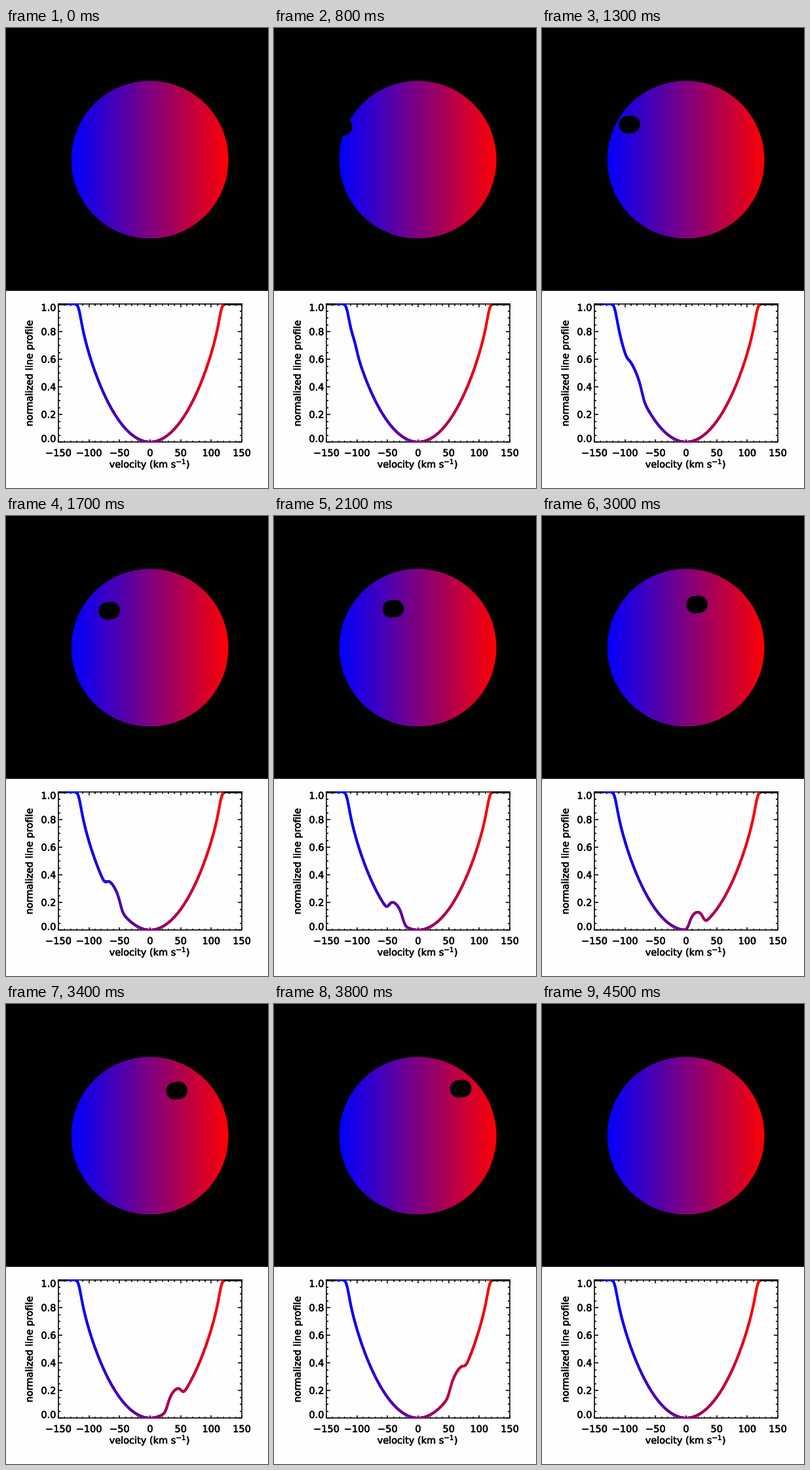
Write a matplotlib script that moves like this. It is 400x700 px and loops after 5300 ms.

```python
import numpy as np
import matplotlib.pyplot as plt
from matplotlib.animation import FuncAnimation
from matplotlib.collections import LineCollection
from matplotlib.patches import Circle, Rectangle
from matplotlib.patheffects import withStroke

W, H, DPI = 400, 700, 100
PT = 72 / DPI                     # points per pixel
FRAMES, STEP = 53, 100
FIRST, LAST = 8, 44               # frames with the planet in transit
CX, CY, R = 219.6, 200.4, 120     # star
RP = 13.3                         # planet radius
VSINI, LIMB, BLUR = 116, 0.65, 3
LEFT, RIGHT, TOP, BOTTOM = 80, 360, 420, 630
SKY, PAPER = "#010200", "#fefefe"

plt.rcParams["mathtext.fontset"] = "dejavusans"
fig = plt.figure(figsize=(W / DPI, H / DPI), dpi=DPI, facecolor=PAPER)
ax = fig.add_axes([0, 0, 1, 1])
ax.axis("off")


def px(v):
    return LEFT + (v + 150) * (RIGHT - LEFT) / 300


def py(f):
    return BOTTOM - f * (BOTTOM - TOP)


def doppler(t):
    """Blue to red as t goes from 0 to 1."""
    t = np.clip(t, 0, 1)
    return np.stack([t, 0 * t, 1 - t], axis=-1)


def label(x, y, s, ha="center", **kw):
    ax.text(x, y, s, family="DejaVu Sans", size=14.5 * PT, color="black",
            ha=ha, va="baseline",
            path_effects=[withStroke(linewidth=0.4, foreground="black")], **kw)


def line(x, y):
    ax.plot(x, y, color="black", lw=1.6 * PT, solid_capstyle="butt", zorder=4)


def planet(n):
    return 133.5 + 6.06 * (n - 13), 147 - 0.725 * (n - 13)


# line profile
pad = np.arange(-170, 170.5, 0.5)
shown = np.abs(pad) <= 150
vel = pad[shown]
strip = pad / VSINI
chord = np.clip(1 - strip ** 2, 0, None)
kernel = np.exp(-0.5 * (np.arange(-15, 15.5, 0.5) / BLUR) ** 2)
kernel /= kernel.sum()


def blur(a):
    return np.convolve(a, kernel, mode="same")[shown]


star = blur(2 * (1 - LIMB) * np.sqrt(chord) + LIMB * np.pi / 2 * chord)


def blocked(n):
    """Light hidden by the planet in each velocity strip."""
    x0, y0 = planet(n)
    half = np.sqrt(np.clip((RP / R) ** 2 - (strip - (x0 - CX) / R) ** 2, 0, None))
    k = np.linspace(-0.975, 0.975, 40)[:, None]
    mu2 = 1 - strip ** 2 - ((y0 - CY) / R + k * half) ** 2
    light = np.where(mu2 > 0, 1 - LIMB * (1 - np.sqrt(np.clip(mu2, 0, None))), 0)
    return blur(2 * half * light.mean(axis=0))


def profile(n):
    flux = star - blocked(n) if FIRST <= n <= LAST else star
    pts = np.column_stack([px(vel), py(1 - flux / star.max())])
    return np.stack([pts[:-1], pts[1:]], axis=1)


# star and planet
ax.add_patch(Rectangle((0, 0), W, 400, color=SKY, lw=0))
shades = doppler((np.arange(240) + 0.5) / 240)[None]
disc = ax.imshow(shades, extent=(CX - R, CX + R, CY + R, CY - R),
                 interpolation="nearest", aspect="auto", zorder=2)
ax.set_xlim(0, W)
ax.set_ylim(H, 0)
disc.set_clip_path(Circle((CX, CY), R, transform=ax.transData))
spots = [ax.add_patch(Circle((0, 0), RP, color=SKY, lw=0, zorder=3)) for _ in range(2)]

# plot frame, ticks and labels
line([LEFT, RIGHT, RIGHT, LEFT, LEFT], [TOP, TOP, BOTTOM, BOTTOM, TOP])
for v in range(-150, 151, 10):
    size = 2.5 if v % 50 else 4.5
    line([px(v)] * 2, [BOTTOM, BOTTOM - size])
    line([px(v)] * 2, [TOP, TOP + size])
for v in range(-150, 151, 50):
    label(px(v), 651.5, str(v).replace("-", "\u2212"))
for k in range(21):
    y = py(k / 20)
    size = 3 if k % 4 else 6
    line([LEFT, LEFT + size], [y, y])
    line([RIGHT, RIGHT - size], [y, y])
for k in range(6):
    base = np.clip(py(k / 5) + 5.3, TOP + 10.5, BOTTOM)
    label(76.5, base, f"{k / 5:.1f}", ha="right")
label(219.5, 669, "velocity (km s$^{-1}$)")
label(40.5, 525, "normalized line profile", rotation=90, rotation_mode="anchor")

mid = (vel[:-1] + vel[1:]) / 2
colors = doppler((mid + VSINI) / (2 * VSINI))
colors[(mid < -134) | (mid > 122)] = 0
curve = ax.add_collection(LineCollection(
    profile(0), colors=colors, linewidths=4 * PT, capstyle="round", zorder=5),
    autolim=False)
curve.set_clip_path(Rectangle((LEFT - 1, TOP - 1), RIGHT - LEFT + 2, BOTTOM - TOP + 2,
                              transform=ax.transData))


def draw(n):
    for spot, shift in zip(spots, (-0.5, 0.5)):
        spot.center = planet(n + shift)
        spot.set_visible(FIRST <= n <= LAST)
    curve.set_segments(profile(n))
    return [*spots, curve]


anim = FuncAnimation(fig, draw, frames=FRAMES, interval=STEP, repeat=True,
                     repeat_delay=0, blit=False)
plt.show()
```
